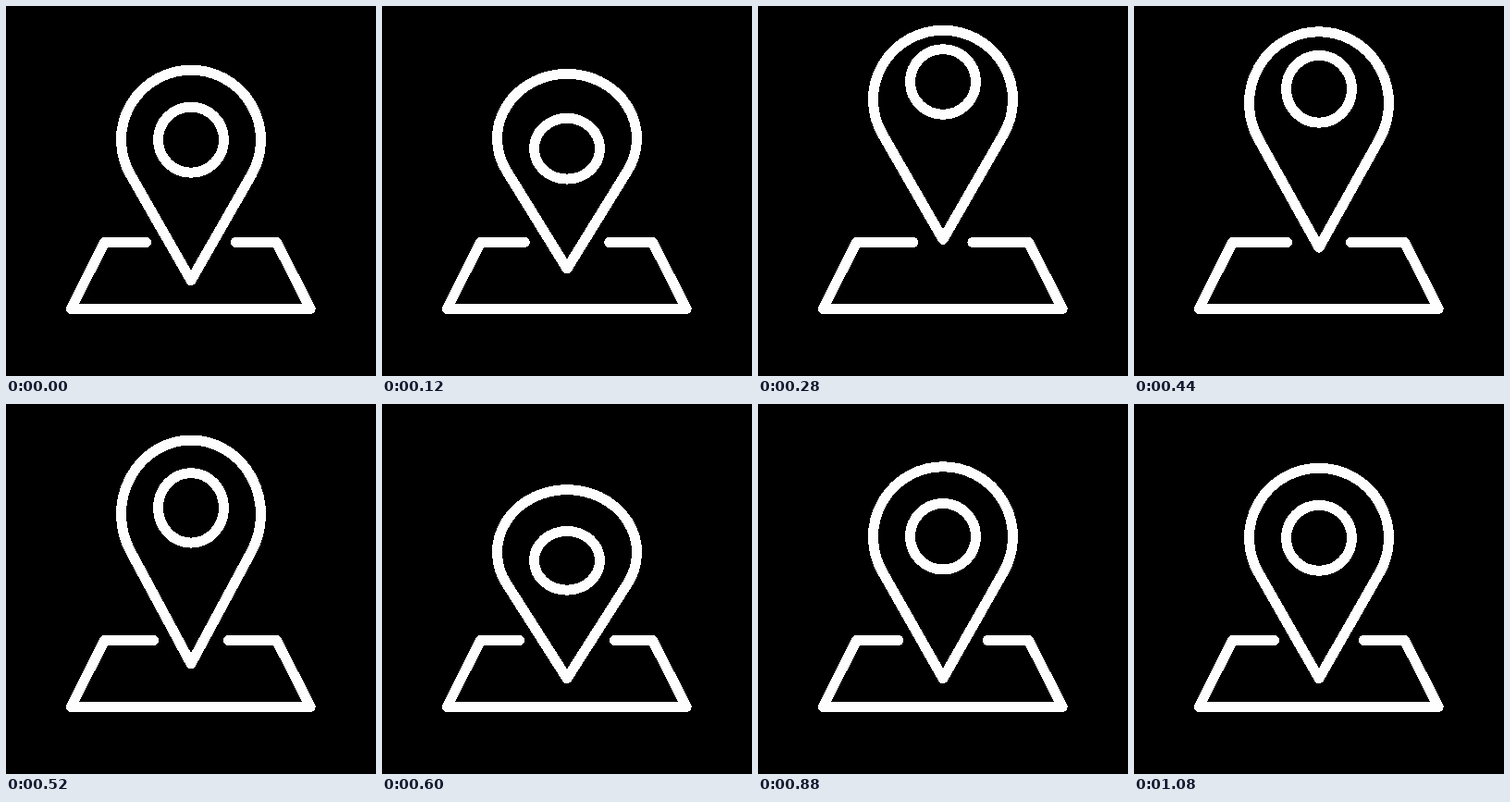
These frames come from a looping animation (400x400 px, 1.16 s). An HTML page:

```html
<!DOCTYPE html>
<html lang="en">
<head>
<meta charset="utf-8">
<title>Map pin</title>
<style>
  html, body { margin: 0; width: 100%; height: 100%; overflow: hidden; background: #000; }
  svg { display: block; width: 100vw; height: 100vh; }
  g {
    fill: none; stroke: #fefefe; stroke-width: 11;
    stroke-linecap: round; stroke-linejoin: round; shape-rendering: crispEdges;
  }
</style>
</head>
<body>
<svg viewBox="0 0 400 400">
  <g>
    <path id="base"/>
    <path id="pin"/>
    <ellipse id="ring" cx="200" rx="35.5"/>
  </g>
</svg>
<script>
const LOOP = 1160, STEP = 40, LAST = 1080;
const GROUND = 296.7, HEIGHT = 228, RADIUS = 75.5, HEAD = 152;
const CROUCH_END = 180, TAKEOFF = 84, TOUCHDOWN = 566, IMPACT = 600;
const APEX = (TAKEOFF + TOUCHDOWN) / 2;

const [base, pin, ring] = ["base", "pin", "ring"].map(id => document.getElementById(id));

// Height of the jump, 0 on the ground and 1 at the apex.
function arcAt(t) {
  const u = (t - TAKEOFF) / (TOUCHDOWN - TAKEOFF);
  return Math.max(0, 4 * u * (1 - u));
}

// Squash before the jump.
function crouchAt(t) {
  return t < CROUCH_END ? 22 * Math.sin(Math.PI * t / CROUCH_END) ** 2 : 0;
}

// Stretch that grows with falling speed.
function stretchAt(t) {
  if (t < APEX || t > TOUCHDOWN) return 0;
  return 20 * ((t - APEX) / (TOUCHDOWN - APEX)) ** 1.4;
}

// Damped squash after landing.
function bounceAt(t) {
  const s = t - IMPACT;
  return s < 0 ? 0 : 23.5 * Math.exp(-s / 100) * Math.cos(2 * Math.PI * s / 560);
}

function draw(t) {
  const arc = arcAt(t), crouch = crouchAt(t), bounce = bounceAt(t);
  const tip = GROUND - 46 * arc;
  const s = (HEIGHT - crouch - bounce + stretchAt(t) - 1.5 * arc) / HEIGHT;
  const center = tip - HEAD * s;

  // Straight sides touch the round head at a tangent.
  const sin = RADIUS / HEAD, cos = Math.sqrt(1 - sin * sin);
  const dx = RADIUS * cos, y = center + RADIUS * sin * s;
  pin.setAttribute("d",
    `M200 ${tip}L${200 - dx} ${y}A${RADIUS} ${RADIUS * s} 0 1 1 ${200 + dx} ${y}Z`);

  // The ring slides inside the head, ahead of the pin's own motion.
  ring.setAttribute("cy", center + crouch + 0.38 * bounce - 20 * arc);
  ring.setAttribute("ry", 35.5 * s);

  // The gap in the map edge follows the width of the pin.
  const gap = 32.8 + 0.37 * (tip - 255) + 30 * (1 - s);
  base.setAttribute("d",
    `M${200 - gap} 255.5H106.5L70.2 327.5H329.2L292.5 255.5H${200 + gap}`);
}

const begin = performance.now();
function tick() {
  const t = (performance.now() - begin) % LOOP;
  draw(Math.min(LAST, Math.floor(t / STEP) * STEP));
  requestAnimationFrame(tick);
}
tick();
</script>
</body>
</html>
```
